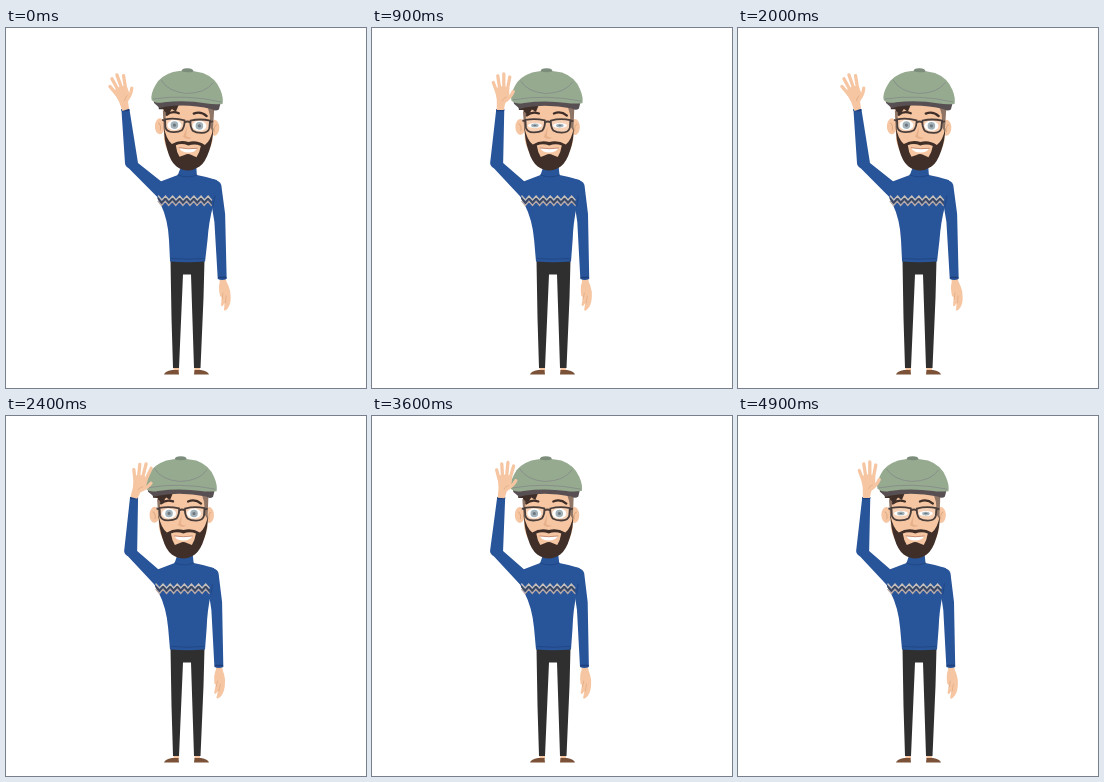
An HTML page that plays this animation: 360 by 360 pixels, repeating every 5 s.

```html
<!DOCTYPE html>
<html lang="en">
<head>
<meta charset="utf-8">
<title>Waving man</title>
<style>
html, body { margin: 0; width: 100%; height: 100%; overflow: hidden; background: #fff; }
svg { display: block; width: 100vw; height: 100vh; }
.blue { fill: #28549a; }
.skin { fill: #f6c6a3; }
.finger { fill: none; stroke: #f6c6a3; stroke-linecap: round; stroke-linejoin: round; }
.hair { fill: #3f2f28; }
.line { fill: none; stroke-linecap: round; }
</style>
</head>
<body>
<svg viewBox="0 0 360 360">
  <!-- legs and shoes -->
  <path class="skin" d="M167.500 338h5.500v5h-5.500zM188.500 338h5.500v5h-5.500z"/>
  <path fill="#7b5138" d="M158 346.500q1-3.500 8-4.500h6.500l.5 4.500zM203 346.500q-1-3.500-8-4.500h-6.500l-.5 4.500z"/>
  <path fill="#302f30" d="M164.500 232H198.500L197.500 270 194.500 340H188L185 246.500H177L173 340H167L165.500 290z"/>

  <g id="rightHand">
    <path class="skin" d="M209.500 250h6q.5 4 2.500 8 2 5 1.500 12-.5 8-4.500 11.500-2 2-3 .5l1-7-2 3q-2 .5-1.500-2l1-7-1.500-1q-1.500-9 .5-14z"/>
    <path class="line" stroke="#dda981" stroke-width=".7" d="M212 265l-1 6M215 268l-1 7"/>
  </g>
  <path id="rightArm" class="blue"/>
  <path id="rightCuff" class="line" stroke="#1c3f7c" stroke-width="1.500"/>

  <path id="leftArm" class="blue"/>
  <path id="leftCuff" class="line" stroke="#1c3f7c" stroke-width="2.500"/>

  <g id="torso">
    <path class="blue" d="M171 138H186L187 147Q198 149 207 152L212 160 204.500 178Q201 194 200.500 212L199 233.500Q181 235 164 233.500L162 212Q160 191 152 176L146 164 151 153.500 168 147z"/>
    <path class="line" stroke="#1f457f" stroke-width=".8" d="M168 147q10 4 19 0M165 230.500q16 1.500 33 0M204.500 178l1.500-10M152 176l-3-6"/>
    <g id="knit" class="line" stroke-width="1.400"></g>
  </g>

  <g id="head">
    <ellipse class="skin" cx="148.500" cy="99" rx="5" ry="8"/>
    <ellipse class="skin" cx="203" cy="99" rx="5" ry="8"/>
    <path class="line" stroke="#dda981" stroke-width="1" d="M147 96q3 2 2 7M205 96q-3 2-2 7"/>
    <path class="skin" d="M151 70H201.500V112Q197 135 177.500 139 158 135 153 112z"/>
    <path class="hair" d="M146 74H168L164 84 160 81.500 157 86 153 87 151.500 82 147 82z"/>
    <path fill="#8f7566" d="M151 83l3 2 0 15-1.500 3zM195 76h7.500l-1 27-2.500-4-1-13z"/>
    <path class="hair" d="M152.500 99Q155 112 161 116.500 169 111.500 177.500 114 186 111.500 194 116.500 200 112 202 99 202 112 198.500 122 195 134 189 138.500 177.500 146.500 166 138.500 160 134 156.500 122 153 112 152.500 99z"/>
    <path class="skin" d="M165 117.500q6-2.500 12.500 0 6.500-2.500 12.500 0-1 7-4 11.500l-5-2q-3.500-2-7 0l-5 2q-3-4.500-4-11.500z"/>
    <path fill="#fff" d="M168.500 120q9 1.500 18 0-2 4.500-9 4.500t-9-4.500z"/>
    <path class="line" stroke="#b9775f" stroke-width=".8" d="M168.500 120q9 1.500 18 0"/>
    <path fill="#e7b18b" d="M176 98l-4 11q4 3.500 9 .5-5 0-6-2z"/>
    <g id="eyes">
      <ellipse cx="163" cy="97.500" rx="7" ry="5" fill="#fff"/>
      <ellipse cx="188" cy="97.500" rx="7" ry="5" fill="#fff"/>
      <circle cx="163" cy="97.500" r="3.800" fill="#8c9fa8"/>
      <circle cx="188" cy="97.500" r="3.800" fill="#8c9fa8"/>
      <circle cx="163" cy="97.500" r="1.600" fill="#4a5560"/>
      <circle cx="188" cy="97.500" r="1.600" fill="#4a5560"/>
    </g>
    <path class="line" stroke="#3f2f28" stroke-width="2.300" d="M155 87.500q5-4.500 12-2M182 85.500q7-3 13 2"/>
    <g fill="#fff" fill-opacity=".2" stroke="#4a3e3b" stroke-width="1.800">
      <path d="M153.500 92q10-2 19.500 .5 .5 6-2.500 10-3 2-8.500 2-7 0-8-5z"/>
      <path d="M198.500 92q-10-2-19.500 .5-.5 6 2.500 10 3 2 8.500 2 7 0 8-5z"/>
      <path fill="none" d="M173 94.500q3-2 6 0M153.500 93.500l-3-1M198.500 93.500l3-1"/>
    </g>
    <!-- cap -->
    <path fill="#574f52" d="M141 70Q174 63 209 72L207 80.500Q204 83 200 80.500 176 75.500 153 79.500L148 81 142 76z"/>
    <path fill="#96aa90" d="M139.500 73Q138 67 143 58 147 49 160 44.500 174 41 190 44.500 203 49 208 61 211.500 69 210.500 75 202 76 195 75 174 72 152 75 144 77 139.500 73z"/>
    <path fill="#7d8d7b" d="M168.500 43.500q0-3.300 6-3.300t6 3.300q-6 1.500-12 0z"/>
    <path class="line" stroke="#868d8a" stroke-width=".9" d="M148.500 53Q155 64 173.500 65.500 193 65 200.500 54M141 72Q174 66 209 73"/>
  </g>

  <g id="leftHand">
    <path class="skin" d="M124.500 82L124.500 72 122.500 61Q129 56 137 60L137 68 133 75 131.500 82z"/>
    <path class="finger" stroke-width="3.300" d="M124.500 64L121 54.500M127.500 61L125.500 48M131.500 60L131.500 46M135 62L137.500 49M132.500 73Q138 70 141 63.500"/>
    <path class="line" stroke="#dda981" stroke-width=".7" d="M134 69q-3 1-4 4"/>
  </g>
</svg>
<script>
const el = id => document.getElementById(id);
const set = (id, name, value) => el(id).setAttribute(name, value);
const LOOP = 5000, STEP = 100, WAVE = 2000 / 3, BLINK = 2000;

// three rows of zigzag across the chest
const zigzag = (y, color) => {
  let d = "";
  for (let i = 0; i < 16; i++)
    d += (i ? "L" : "M") + (149.5 + i * 3.55) + " " + (y + (i % 2 ? 2 : -2));
  return `<path stroke="${color}" d="${d}"/>`;
};
el("knit").innerHTML =
  zigzag(170, "#c9c0b8") + zigzag(172.7, "#404658") + zigzag(175.4, "#b9a9a4");

// -1 at the given share of the wave, +1 half a wave later
const swing = (t, low) => -Math.cos(2 * Math.PI * (t / WAVE - low));

function draw(t) {
  const sway = swing(t, .47);
  const lean = sway + 1;
  const hand = swing(t, .57);
  const k = .022 * lean;
  const shift = y => k * (235 - y);

  set("torso", "transform", `matrix(1 0 ${-k} 1 ${235 * k} 0)`);
  set("head", "transform",
    `translate(${2.6 * lean - 1} 0) rotate(${.85 * lean} 177 140)`);

  // raised arm
  const e = .5 * lean, s = shift(160), wrist = 124.5 - 5.2 * sway;
  set("leftArm", "d",
    `M${152 + s} 153.500L${131 + e} 135 ${wrist + 4} 81H${wrist - 4}
     L${118 + e} 135Q${118 + e} 138 ${122 + e} 140.500L${153 + s} 174z`);
  set("leftCuff", "d", `M${wrist - 2.8} 82h5.600`);
  set("leftHand", "transform",
    `translate(${wrist - 128} 0) rotate(${-18 * (hand + .187)} 128 81)`);

  // hanging arm
  const c = 2 * lean, m = (s + c) / 2;
  set("rightArm", "d",
    `M${203 + s} 151.500Q${210.5 + s} 152 ${212 + s} 157L${215.500 + m} 186
     ${216.7 + c} 251Q${212 + c} 253 ${207.8 + c} 251L${204.8 + m} 194 ${202 + s} 175z`);
  set("rightCuff", "d", `M${208.8 + c} 249.500h7`);
  set("rightHand", "transform", `translate(${c} 0) rotate(${-4 * hand} 213 250)`);

  const gap = Math.abs(t % BLINK - 1000);
  const open = Math.min(1, .1 + gap / 250);
  set("eyes", "transform", `translate(0 ${97.5 * (1 - open)}) scale(1 ${open})`);
}

const start = performance.now();
function tick() {
  const t = (performance.now() - start) % LOOP;
  draw(Math.floor(t / STEP) * STEP);
  requestAnimationFrame(tick);
}
tick();
</script>
</body>
</html>
```
